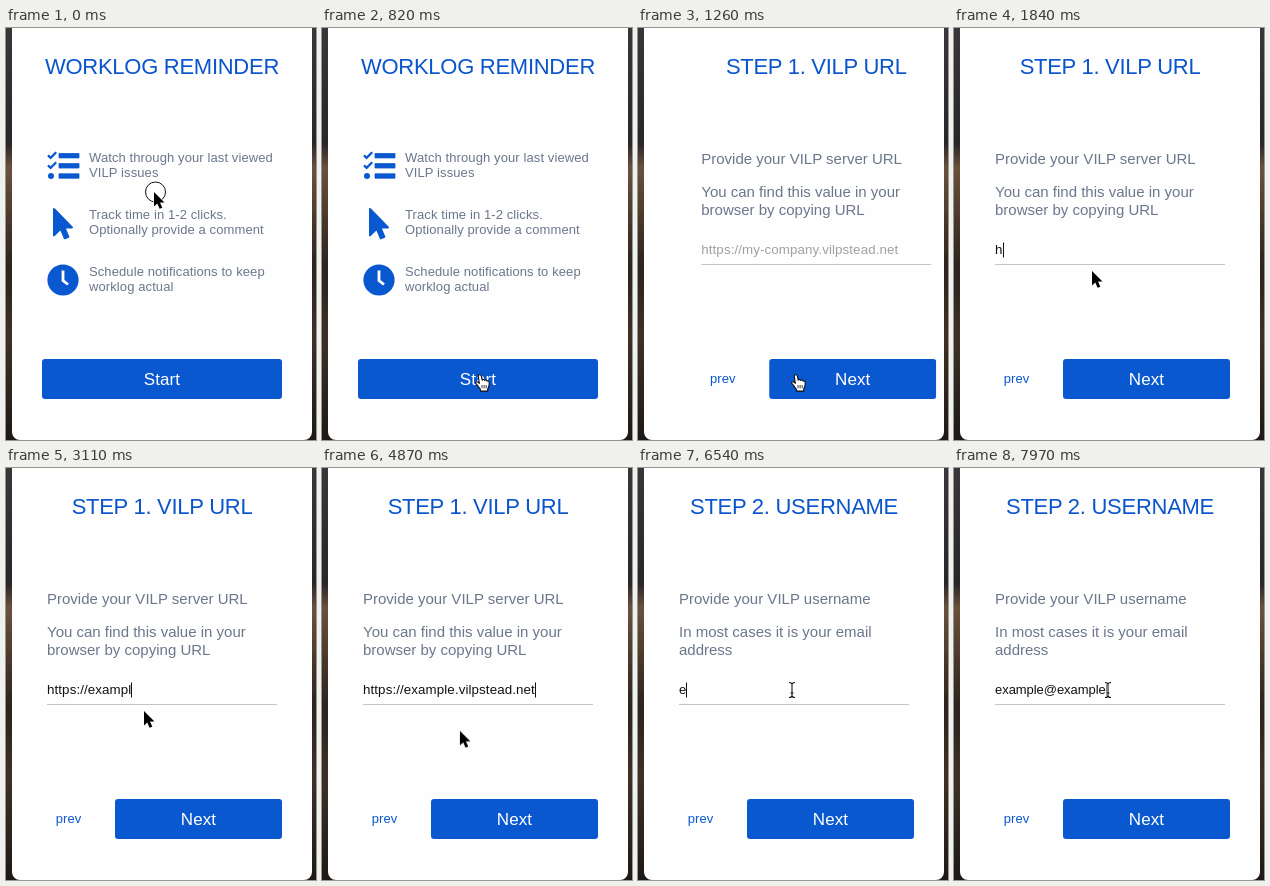
Recreate the animation shown at these times as an HTML page. Size 310x412 px, loop 8000 ms.

```html
<!DOCTYPE html>
<html lang="en">
<head>
<meta charset="utf-8">
<title>Worklog reminder</title>
<style>
  html, body { margin: 0; width: 100%; height: 100%; overflow: hidden; background: #2a2522; }
  svg { display: block; width: 310px; height: 412px; font-family: "Liberation Sans", Arial, sans-serif; }
  text { white-space: pre; }

  .title { font-size: 22px; letter-spacing: -.27px; fill: #0a55cc; text-anchor: middle; }
  .feature { font-size: 13px; letter-spacing: .1px; fill: #6b778c; }
  .hint { font-size: 15px; fill: #6b778c; }
  .action { font-size: 17px; letter-spacing: .1px; fill: #fff; text-anchor: middle; }
  .back { font-size: 13px; fill: #0a58d0; text-anchor: middle; }
  .url { font-size: 13.33px; letter-spacing: .1px; }
  .mail { font-size: 13px; letter-spacing: -.05px; }
  .placeholder { fill: #a0a0a0; }
  .typed { fill: #111; }
  .caret { stroke: #111; }
  .underline { stroke: #c6c6c6; }
  .blue { fill: #0a58d0; }

  .track, .cursor, .cursor > * { animation: 8s linear infinite; }
  .track { animation-name: slide; }
  .cursor { animation-name: travel; }
  .cursor > * { animation-timing-function: step-end; }
  .cursor > .ring { animation-name: ring; }
  .cursor > .arrow { animation-name: arrow; }
  .cursor > .hand { animation-name: hand; }
  .cursor > .beam { animation-name: beam; }

  @keyframes slide {
    0% { transform: translateX(0); }
    14.125% { transform: translateX(0); animation-timing-function: cubic-bezier(.1, .7, .15, 1); }
    17.75% { transform: translateX(-300px); }
    62.3125% { transform: translateX(-300px); animation-timing-function: cubic-bezier(.1, .7, .15, 1); }
    65.9375%, 100% { transform: translateX(-600px); }
  }
  @keyframes travel {
    0% { transform: translate(148px, 164px); }
    3.4% { transform: translate(148px, 164px); animation-timing-function: ease-in-out; }
    10% { transform: translate(158px, 347px); }
    17.75% { transform: translate(158px, 347px); animation-timing-function: ease-in-out; }
    20% { transform: translate(138px, 243px); }
    59% { transform: translate(138px, 243px); }
    60.875% { transform: translate(138px, 262px); }
    62% { transform: translate(128px, 339px); }
    66% { transform: translate(128px, 339px); animation-timing-function: ease-in-out; }
    67.625%, 100% { transform: translate(154px, 222px); }
  }
  @keyframes ring { 0% { visibility: visible; } .625%, 100% { visibility: hidden; } }
  @keyframes arrow {
    0%, 18.3%, 66.3% { visibility: visible; }
    9%, 61.9%, 67.3%, 100% { visibility: hidden; }
  }
  @keyframes hand {
    9%, 61.9% { visibility: visible; }
    0%, 18.3%, 66.3%, 100% { visibility: hidden; }
  }
  @keyframes beam { 0% { visibility: hidden; } 67.3%, 100% { visibility: visible; } }
</style>
</head>
<body>
<svg viewBox="0 0 310 412">
  <defs>
    <linearGradient id="mountain" x2="0" y2="1">
      <stop offset="0" stop-color="#39353a"/>
      <stop offset=".28" stop-color="#29262a"/>
      <stop offset=".34" stop-color="#6a513c"/>
      <stop offset=".46" stop-color="#4a392b"/>
      <stop offset=".58" stop-color="#2c231d"/>
      <stop offset=".75" stop-color="#3e3025"/>
      <stop offset="1" stop-color="#1d1916"/>
    </linearGradient>
    <clipPath id="panel"><rect x="6" y="-20" width="300" height="432" rx="8"/></clipPath>
  </defs>

  <rect width="310" height="412" fill="url(#mountain)"/>
  <rect x="6" y="-20" width="300" height="432" rx="8" fill="#fefefe"/>

  <g clip-path="url(#panel)">
    <g class="track">
      <g>
        <text class="title" x="156" y="46">WORKLOG REMINDER</text>

        <g class="blue">
          <path d="M53 125.5h20v4.4h-20zM53 135.6h20v4.4h-20zM53 145.8h20v4.4h-20z" stroke="#0a58d0" stroke-width=".8" stroke-linejoin="round"/>
          <path d="M42 127.3l2.6 2.5 5.6-5.6M42 137.4l2.6 2.5 5.6-5.6" fill="none" stroke="#0a58d0" stroke-width="2.3"/>
          <circle cx="45" cy="148" r="3"/>
          <path d="M48 181l18 18.4h-7.6l4 9.4-3.6 1.5-4-9.5-6.8 6.6z" stroke="#0a58d0" stroke-width="2" stroke-linejoin="round"/>
          <circle cx="57" cy="252" r="15.6"/>
          <path d="M57 242.5v10l5 4" fill="none" stroke="#fefefe" stroke-width="2.8"/>
        </g>

        <g class="feature">
          <text x="83" y="134">Watch through your last viewed</text>
          <text x="83" y="149">VILP issues</text>
          <text x="83" y="191">Track time in 1-2 clicks.</text>
          <text x="83" y="206">Optionally provide a comment</text>
          <text x="83" y="248">Schedule notifications to keep</text>
          <text x="83" y="263">worklog actual</text>
        </g>

        <rect class="blue" x="36" y="331" width="240" height="40" rx="3"/>
        <text class="action" x="156" y="357">Start</text>
      </g>

      <g transform="translate(300)">
        <text class="title" x="156" y="46">STEP 1. VILP URL</text>
        <g class="hint">
          <text x="41" y="136">Provide your VILP server URL</text>
          <text x="41" y="169">You can find this value in your</text>
          <text x="41" y="187">browser by copying URL</text>
        </g>
        <g class="field url" id="url">
          <text class="placeholder" x="41" y="226">https://my-company.vilpstead.net</text>
          <text class="typed" x="41" y="226"></text>
          <path class="caret" d="M.5 214.5v15"/>
        </g>
        <path class="underline" d="M41 236.5h230"/>
        <text class="back" x="62.5" y="355">prev</text>
        <rect class="blue" x="109" y="331" width="167" height="40" rx="3"/>
        <text class="action" x="192.5" y="357">Next</text>
      </g>

      <g transform="translate(600)">
        <text class="title" x="156" y="46">STEP 2. USERNAME</text>
        <g class="hint">
          <text x="41" y="136">Provide your VILP username</text>
          <text x="41" y="169">In most cases it is your email</text>
          <text x="41" y="187">address</text>
        </g>
        <g class="field mail" id="mail">
          <text class="placeholder" x="41" y="226">jmirsk@clupmone.com</text>
          <text class="typed" x="41" y="226"></text>
          <path class="caret" d="M.5 214.5v15"/>
        </g>
        <path class="underline" d="M41 236.5h230"/>
        <text class="back" x="62.5" y="355">prev</text>
        <rect class="blue" x="109" y="331" width="167" height="40" rx="3"/>
        <text class="action" x="192.5" y="357">Next</text>
      </g>
    </g>
  </g>

  <g class="cursor">
    <circle class="ring" cx="1.5" cy="0" r="10" fill="none" stroke="#111"/>
    <path class="arrow" d="M0 0v14.6l3.3-3.1 2.3 5.3 2.7-1.1-2.3-5.2h4.5z" stroke="#fff" stroke-width="1.2" paint-order="stroke"/>
    <g class="hand" fill="#fff" stroke="#111" stroke-width="1.1" stroke-linejoin="round">
      <path d="M-1.7 1C-1.7-.7 1-.7 1.3 1l.9 4.2c.5-1 2.3-.8 2.6.3.5-.8 2.1-.5 2.3.6.7-.6 1.9 0 2 1.2.3 2.8-.1 4.9-1.4 6.8v2H.5v-1.6C-1 12.6-2.3 10.5-4 8.7c-.9-1.2.5-2.4 1.8-1.6l1.5 1.2z"/>
      <path d="M2 10v3.3M4.1 10v3.3M6.2 10v3.3" fill="none" stroke-width=".8"/>
    </g>
    <g class="beam" fill="none">
      <path id="ibeam" d="M-3-7.5q3 0 3 2v11q0 2-3 2M3-7.5q-3 0-3 2M0 5.5q0 2 3 2M-1.5 3h3" stroke="#fff" stroke-width="2.6"/>
      <use href="#ibeam"/>
      <path d="M-3-7.5q3 0 3 2v11q0 2-3 2M3-7.5q-3 0-3 2M0 5.5q0 2 3 2M-1.5 3h3" stroke="#111" stroke-width="1.1"/>
    </g>
  </g>
</svg>

<script>
  const LOOP = 8000;

  // Each burst is [first key, last key, number of keys], in ms.
  const keyTimes = bursts => bursts.flatMap(([first, last, count]) =>
    Array.from({ length: count }, (_, i) => first + (last - first) * i / Math.max(1, count - 1)));

  const makeField = (id, value, bursts) => {
    const root = document.getElementById(id);
    const part = name => root.querySelector('.' + name);
    return {
      value,
      times: keyTimes(bursts),
      placeholder: part('placeholder'),
      typed: part('typed'),
      caret: part('caret'),
      shown: -1
    };
  };

  const fields = [
    makeField('url', 'https://example.vilpstead.net', [
      [1790, 2040, 4], [2180, 2180, 1], [2330, 2330, 1], [2480, 2620, 3], [2770, 3110, 5],
      [3250, 3350, 2], [3500, 3500, 1], [3640, 3640, 1], [3790, 4330, 7], [4480, 4720, 4]
    ]),
    makeField('mail', 'example@example', [
      [6477, 6940, 7], [7140, 7140, 1], [7380, 7380, 1], [7530, 7820, 5], [7970, 7970, 1]
    ])
  ];

  function showTyping(field, time) {
    const count = field.times.filter(t => t <= time).length;
    if (count === field.shown) return;
    field.shown = count;
    field.typed.textContent = field.value.slice(0, count);
    field.placeholder.style.display = count ? 'none' : '';
    field.caret.style.display = count ? '' : 'none';
    const end = count ? field.typed.getComputedTextLength() : 0;
    field.caret.setAttribute('transform', `translate(${Math.round(41 + end)})`);
  }

  let start;
  function frame(now) {
    start ??= now;
    const time = (now - start) % LOOP;
    fields.forEach(field => showTyping(field, time));
    requestAnimationFrame(frame);
  }
  requestAnimationFrame(frame);
</script>
</body>
</html>
```
